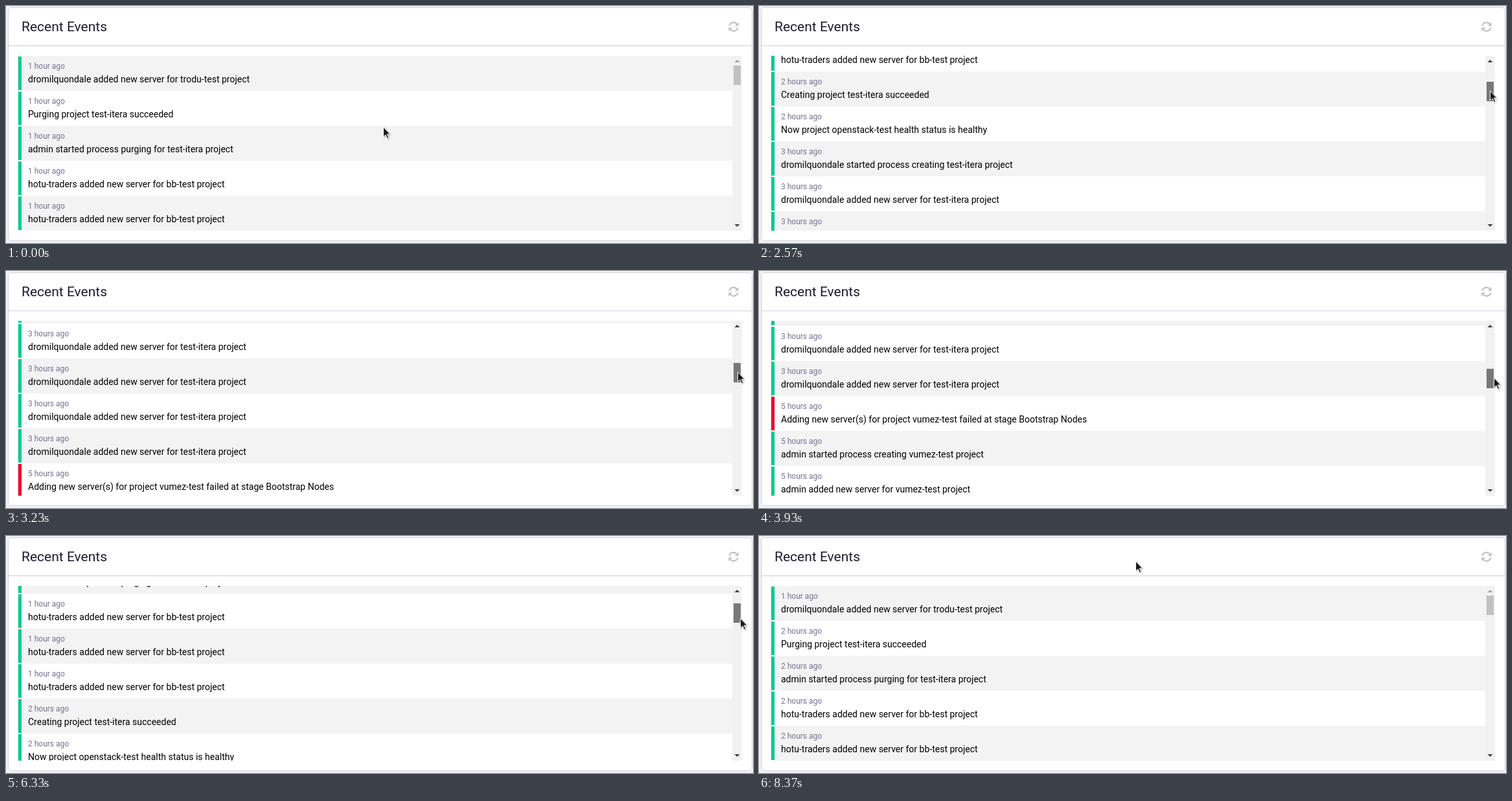
Write an HTML page that moves like this. It is 1153x366 px and loops after 9.41 s.

```html
<!DOCTYPE html>
<html lang="en">
<head>
<meta charset="utf-8">
<title>Recent Events</title>
<style>
  html, body { margin: 0; width: 100%; height: 100%; overflow: hidden; background: #f2f2f8; }
  body { position: relative; font-family: Roboto, sans-serif; color: #000; }
  body * { position: absolute; box-sizing: border-box; white-space: nowrap; }
  #card { left: 3px; top: 2px; width: 1149px; height: 361px; background: #fff; border: 1px solid #cfcfdc; border-radius: 5px; }
  #rule { left: 4px; top: 61px; width: 1147px; height: 1px; background: #cfcfdc; }
  h1 { left: 24px; top: 20px; margin: 0; font-size: 21px; font-weight: 400; line-height: 24px; color: #1c1c2e; }
  #refresh { left: 1115px; top: 24px; color: #bfbfbf; }
  #view { left: 18px; top: 77px; width: 1103px; height: 270px; overflow: hidden; }
  #list { left: 0; top: 0; width: 100%; }
  .row { left: 6px; width: 1097px; height: 54px; }
  .row:nth-child(odd) { background: #f3f3f3; }
  .bar { left: -6px; top: 1px; width: 6px; height: 52px; background: #0bca92 padding-box; border-left: 1px solid #0bca9240; }
  .failed .bar { background-color: #ea0a30; border-color: #ea0a3040; }
  .when { left: 10px; top: 9px; font-size: 12px; line-height: 14px; color: #74708f; }
  .what { left: 10px; top: 28px; font-size: 14px; line-height: 16px; }
  #track { left: 1121px; top: 77px; width: 15px; height: 270px; background: #f1f1f1; }
  #thumb { left: 2px; width: 11px; height: 30px; }
  #track svg { left: 0; top: 0; }
  #veil { left: 4px; top: 3px; width: 1147px; height: 359px; border-radius: 4px; background: #fff; opacity: 0; }
  #cursor { left: 0; top: 0; overflow: visible; filter: drop-shadow(1px 1px 1px rgba(0, 0, 0, .3)); }
</style>
</head>
<body>
<div id="card"></div>
<div id="rule"></div>
<h1>Recent Events</h1>
<svg id="refresh" width="16" height="16" viewBox="0 0 16 16">
  <defs>
    <g id="half">
      <path d="M1.5 6.6A6.6 6.6 0 0 1 12.9 3.6" fill="none" stroke="currentColor" stroke-width="2.1"/>
      <path d="M15.6 1V6.7H9.9Z" fill="currentColor"/>
    </g>
  </defs>
  <use href="#half"/>
  <use href="#half" transform="rotate(180 8 8)"/>
</svg>
<div id="view"><div id="list"></div></div>
<div id="track">
  <div id="thumb"></div>
  <svg width="15" height="270">
    <path id="up" d="M3.5 10L7.5 6L11.5 10Z"/>
    <path d="M3.5 260H11.5L7.5 264Z" fill="#404040"/>
  </svg>
</div>
<div id="veil"></div>
<svg id="cursor" width="13" height="20">
  <path d="M1.5 1V16L5 12.9L7.4 18.6L9.8 17.5L7.4 12H12Z" fill="#1b1b1b" stroke="#fff"/>
</svg>
<script>
const LOOP = 9410, ROW = 54, SCROLL_PER_PX = 11.57, PULL = 60.4;
const $ = id => document.getElementById(id);

const user = 'dromilquondale', partner = 'hotu-traders';
const adds = (who, project) => `${who} added new server for ${project} project`;
const repeat = (n, row) => Array(n).fill(row);
const events = [
  [1, adds(user, 'trodu-test')],
  [1, 'Purging project test-itera succeeded'],
  [1, 'admin started process purging for test-itera project'],
  ...repeat(3, [1, adds(partner, 'bb-test')]),
  [2, 'Creating project test-itera succeeded'],
  [2, 'Now project openstack-test health status is healthy'],
  [3, `${user} started process creating test-itera project`],
  ...repeat(6, [3, adds(user, 'test-itera')]),
  [5, 'Adding new server(s) for project vumez-test failed at stage Bootstrap Nodes'],
  [5, 'admin started process creating vumez-test project'],
  ...repeat(3, [5, adds('admin', 'vumez-test')])
];

function make(parent, className, text = '') {
  const el = document.createElement('div');
  el.className = className;
  el.textContent = text;
  return parent.appendChild(el);
}

const ago = hours => `${hours} hour${hours > 1 ? 's' : ''} ago`;
const labels = events.map(([hours, text], i) => {
  const row = make($('list'), text.includes('failed') ? 'row failed' : 'row');
  row.style.top = i * ROW + 'px';
  make(row, 'bar');
  make(row, 'what', text);
  return make(row, 'when', ago(hours));
});

const within = (t, from, to) => t >= from && t < to;
const ramp = (t, from, to) => t >= to ? 1 : Math.max(0, (t - from) / (to - from));
const easeIn = power => p => p ** power;
const easeOut = power => p => 1 - (1 - p) ** power;
const linear = easeIn(1);

const pullDown = t => easeOut(1.5)(ramp(t, 2030, 3700));
const pushUp = t => easeIn(1.3)(ramp(t, 5890, 6425));

// Each move carries the cursor from where it is to a point; "from" is omitted for a jump.
const moves = [
  { to: [618, 208], end: 100 },
  { to: [639, 207], end: 900 },
  { to: [1127, 104], from: 1000, end: 1400 },
  { to: [1129, 104 + PULL], from: 2030, end: 3700, ease: easeOut(1.5) },
  { to: [1133, 104 + PULL], end: 3930 },
  { to: [1131, 54], from: 5880, end: 6830, ease: easeIn(1.42) },
  { to: [1120, 31], from: 6880, end: 7130 },
  { to: [604, 39], from: 7320, end: 8270 },
  { to: [580, 38], end: 8370 }
];

function cursorAt(t) {
  return moves.reduce((point, { to, end, from = end, ease = linear }) => {
    const k = ease(ramp(t, from, end));
    return point.map((v, i) => v + (to[i] - v) * k);
  }, [581, 186]).map(Math.floor);
}

function draw(t) {
  const [x, y] = cursorAt(t);
  const drag = Math.floor(PULL * pullDown(t) * (1 - pushUp(t)));
  const refreshed = t >= 7850;

  $('cursor').style.transform = `translate(${x}px, ${y}px)`;
  $('list').style.transform = `translateY(${-Math.floor(drag * SCROLL_PER_PX)}px)`;
  $('thumb').style.top = 15 + Math.max(0, drag - 1) + 'px';
  $('thumb').style.background = within(t, 1770, 6880) ? '#787878' : within(t, 1400, 1770) ? '#a8a8a8' : '#c1c1c1';
  $('up').style.fill = drag ? '#404040' : '#a3a3a3';
  $('refresh').style.color = within(t, 7030, 7450) ? '#a0a0a0' : '#bfbfbf';
  $('veil').style.opacity = .5 * (ramp(t, 7370, 7520) - ramp(t, 7850, 8050));
  for (const label of labels.slice(1, 6)) {
    const text = ago(refreshed ? 2 : 1);
    if (label.textContent !== text) label.textContent = text;
  }
}

const start = performance.now();
function tick() {
  draw((performance.now() - start) % LOOP);
  requestAnimationFrame(tick);
}
tick();
</script>
</body>
</html>
```
